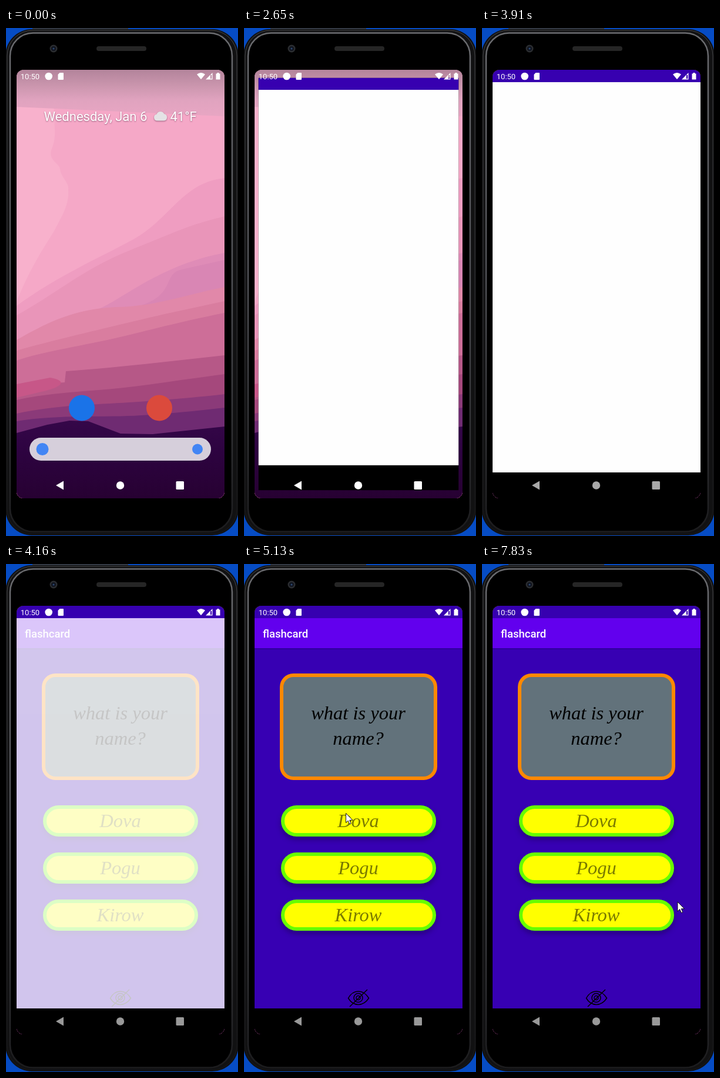
An HTML page for the animation above (8000 ms loop, 395x863 px).

```html
<!DOCTYPE html>
<html lang="en">
<head>
<meta charset="utf-8">
<title>Flashcard app</title>
<style>
html, body { margin: 0; width: 100%; height: 100%; overflow: hidden; background: #000; }
svg { display: block; width: 100vw; height: 100vh; }
text { font-family: Roboto, sans-serif; white-space: pre; }
.script { font: italic 32.5px "Liberation Serif", "Noto Serif", serif; text-anchor: middle; }
.lift { filter: drop-shadow(0 5px 5px rgba(0, 0, 0, .3)); }
.date { filter: drop-shadow(0 1px 1px rgba(60, 20, 50, .5)); }
</style>
</head>
<body>
<svg viewBox="0 0 395 863" preserveAspectRatio="none">
  <defs>
    <clipPath id="screen"><rect x="18" y="71" width="354" height="728" rx="12"/></clipPath>
    <linearGradient id="rim" x2="0" y2="1">
      <stop stop-color="#6b6c70"/><stop offset=".5" stop-color="#505156"/>
      <stop offset="1" stop-color="#1c1c1e"/>
    </linearGradient>
    <linearGradient id="shade" x2="0" y2="1">
      <stop stop-color="#b3849b"/><stop offset=".35" stop-color="#cb96ae"/>
      <stop offset=".65" stop-color="#e0a3bf"/><stop offset="1" stop-color="#e8a6c3"/>
    </linearGradient>
    <linearGradient id="hill" x2="0" y2="1">
      <stop stop-color="#350749"/><stop offset=".4" stop-color="#2d0340"/><stop offset="1" stop-color="#270132"/>
    </linearGradient>
  </defs>

  <!-- phone body -->
  <rect width="395" height="863" fill="#064cc4"/>
  <rect x="45" width="163" height="3" fill="#343a45"/>
  <rect x="-1" y="2" width="397" height="860" rx="45" fill="#111112"/>
  <rect x="2" y="4" width="391" height="856" rx="43" fill="none" stroke="url(#rim)" stroke-opacity=".6"/>
  <rect x="7" y="8.500" width="378" height="847" rx="39" stroke="url(#rim)" stroke-width="2.500"/>
  <circle cx="81" cy="35" r="6.500" fill="#2c2e31"/>
  <circle cx="81" cy="35" r="4" fill="#10141e"/>
  <circle cx="81" cy="35" r="1.600" fill="#2b4670"/>
  <rect x="154" y="31" width="85" height="8" rx="4" fill="#262626"/>

  <g clip-path="url(#screen)">
    <g id="wall">
      <rect x="18" y="71" width="354" height="728" fill="#f5a8c7"/>
      <path fill="#f8b1cc" d="M18 130H82C80 165 88 180 78 205C70 225 92 230 92 240C94 255 108 262 106 275C108 300 95 320 82 345C65 372 40 410 18 465Z"/>
    </g>
    <path fill="url(#shade)" d="M18 71H372V150L18 134Z"/>

    <g id="home">
      <g fill="#fff" font-size="22" class="date">
        <text x="64.500" y="158">Wednesday, Jan 6</text>
        <text x="279.500" y="158">41°F</text>
        <path fill="#e4e2e5" d="M257.500 157.500a5.500 5.500 0 0 1-1-10.900a7 7 0 0 1 12.800-.6a5.800 5.800 0 0 1-.5 11.500z"/>
      </g>
      <circle cx="129" cy="645.500" r="22" fill="#1a73e8"/>
      <circle cx="261" cy="645.500" r="22" fill="#db4a3c"/>
      <rect x="40" y="696" width="309" height="39" rx="19.500" fill="#d6cfdb"/>
      <circle cx="62" cy="715.500" r="10.500" fill="#4285f4"/>
      <circle cx="326" cy="715.500" r="9" fill="#4285f4"/>
    </g>

    <g id="app">
      <rect x="18" y="71" width="354" height="728"/>
      <rect x="18" y="71" width="354" height="21.500" fill="#3700b0"/>
      <rect x="18" y="92" width="354" height="663" fill="#fefefe"/>
      <g id="content">
        <rect x="18" y="92" width="354" height="663" fill="#3700b3"/>
        <rect x="18" y="92" width="354" height="51" fill="#6200ee"/>
        <rect x="18" y="143" width="354" height="2" opacity=".12"/>
        <text x="32" y="125" font-size="18.500" font-weight="500" fill="#fff">flashcard</text>
        <rect x="64" y="189" width="262" height="175" rx="20" fill="#62727b" stroke="#ff8800" stroke-width="6"/>
        <text class="script" x="194.500" y="264">what is your</text>
        <text class="script" x="194.500" y="307">name?</text>
        <g id="answers"></g>
        <g fill="none" stroke="#000" stroke-width="1.500">
          <path d="M177.500 737.500C186 722 203 722 212.500 737.500C203 752 186 752 177.500 737.500ZM180 752L210 723"/>
          <circle cx="194.500" cy="737" r="7.500"/>
          <circle cx="194.500" cy="737" r="3.500"/>
        </g>
      </g>
    </g>

    <g fill="#fff">
      <text x="24.800" y="86.500" font-size="13">10:50</text>
      <circle cx="72.700" cy="82" r="6.300"/>
      <path d="M91.500 76H97q1 0 1 1v10q0 1-1 1h-7.500q-1 0-1-1v-8z"/>
      <path d="M325 78.800q7-5.600 14 0l-7 8.400z"/>
      <path d="M340 87.500L351.500 76v11.500zm8-1.200h2.200v-6.500h-2.200z" fill-rule="evenodd"/>
      <path d="M357.500 77.500h2v-1.500h3v1.500h2v10h-7z"/>
    </g>
    <g id="nav">
      <path d="M98 769.500V784.500L85 777Z"/>
      <circle cx="194.500" cy="777" r="6.700"/>
      <rect x="289.500" y="770" width="13.500" height="14" rx="1.500"/>
    </g>
  </g>

  <path id="cursor" fill="#fff" stroke="#000" stroke-width=".9" d="M.5 .5V16.500L4.200 13L6.800 19L9.300 18L6.800 12.200H12Z"/>
</svg>
<script>
const $ = id => document.getElementById(id);
const LOOP = 8000, OPEN = 2650, FULL = 2800, FADE = 4160, READY = 4280;

// Wallpaper bands: colour, then the upper edge from left to right
const bands = [
  ["#ef9dc1", "18 472C90 420 150 395 215 360S300 262 372 255"],
  ["#e995b9", "18 488C80 455 130 410 210 378S310 335 372 320"],
  ["#df8cb7", "18 530C60 515 130 490 165 474S270 400 372 382"],
  ["#d986b4", "18 540L190 480C300 465 260 418 300 410L372 394"],
  ["#e188a9", "18 530C70 500 120 476 190 474S310 452 372 440"],
  ["#d97d9f", "18 548C80 530 220 498 270 486L372 464"],
  ["#cd6e98", "18 565C60 550 140 538 190 526S310 496 372 484"],
  ["#b65887", "18 608L100 602L102 583C180 578 280 566 372 556"],
  ["#c75788", "18 605L75 594C110 600 90 612 60 618L18 628"],
  ["#a5487c", "18 632C60 622 120 618 170 614S310 596 372 588"],
  ["#8b3a79", "18 655C90 640 150 640 210 636S320 628 372 622"],
  ["#6f2b72", "18 668C90 656 170 662 230 658S330 650 372 645"],
  ["url(#hill)", "18 688L70 674L108 667L140 668L195 689L250 690L372 677"]
];
bands.forEach(([color, edge], i) => {
  const end = i === 8 ? "Z" : "V799H18Z";
  $("wall").insertAdjacentHTML("beforeend", `<path fill="${color}" d="M${edge}${end}"/>`);
});

["Dova", "Pogu", "Kirow"].forEach((name, i) => {
  const y = 410 + i * 80;
  $("answers").insertAdjacentHTML("beforeend",
    `<rect x="66" y="${y + 3}" width="258" height="47" rx="23.5" fill="#ff0" stroke="#6f0" stroke-width="6" class="lift"/>
     <text class="script" x="194.5" y="${y + 37}" fill-opacity=".52">${name}</text>`);
});

// Pointer stops: time, x, y; a bare time hides it
const stops = [
  [0], [500, 262, 762], [620, 302, 806], [900, 332, 830], [1050, 356, 852], [1200],
  [4830, 374, 792], [4980, 262, 572], [5130, 173, 423], [5250, 138, 374], [5390, 114, 396],
  [5530, 142, 424], [5670, 190, 432], [5810, 224, 424],
  [5950, 290, 412], [6090, 323, 446], [6230, 238, 494], [6370, 130, 510], [6510, 79, 530],
  [6650, 104, 566], [6800, 156, 586], [6940, 201, 588],
  [7090, 302, 608], [7240, 376, 619], [7680, 360, 598], [7830, 332.5, 573.5]
];

const show = (id, on) => $(id).setAttribute("display", on ? "inline" : "none");

function draw(t) {
  show("home", t < OPEN);
  show("app", t >= OPEN);
  const scale = t < FULL ? .962 : 1;
  $("app").setAttribute("transform", `translate(195 435) scale(${scale}) translate(-195 -435)`);
  $("content").setAttribute("opacity", t < FADE ? 0 : t < READY ? .22 : 1);

  // Navigation buttons dim in even steps
  const step = t < 3200 ? 0 : t < FADE ? Math.min(6, Math.floor((t - 3200) / 142) + 1) : 7;
  const grey = Math.round(255 - 102 * step / 7);
  $("nav").setAttribute("fill", `rgb(${grey},${grey},${grey})`);

  const [, x, y] = stops.filter(s => s[0] <= t).pop();
  show("cursor", x !== undefined);
  if (x !== undefined) $("cursor").setAttribute("transform", `translate(${x} ${y})`);
}

const start = performance.now();
function tick() {
  draw((performance.now() - start) % LOOP);
  requestAnimationFrame(tick);
}
tick();
</script>
</body>
</html>
```
